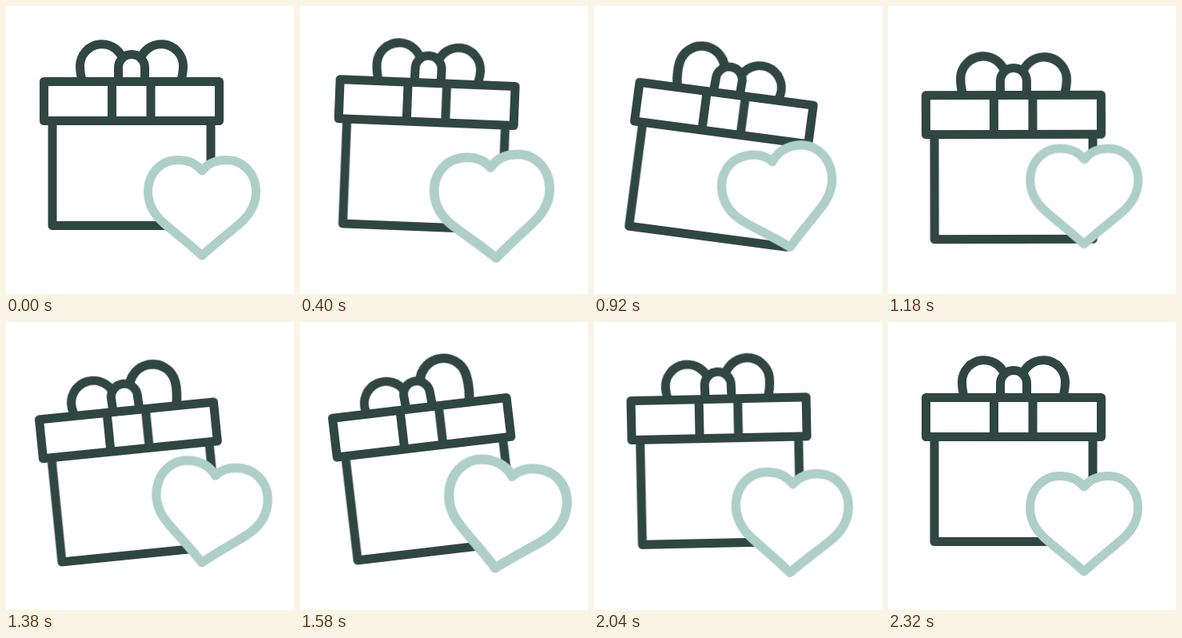
Recreate the animation shown at these times as an HTML page. Size 360 by 360 pixels, loop 2.4 s.

```html
<!DOCTYPE html>
<html lang="en">
<head>
<meta charset="utf-8">
<title>Gift with heart</title>
<style>
  html, body { margin: 0; width: 100%; height: 100%; overflow: hidden; background: #fff; }
  svg { display: block; width: 100vw; height: 100vh; }

  path { fill: none; stroke-width: 11; stroke-linecap: round; stroke-linejoin: round; }
  .solid { fill: #fff; }
  .gift { stroke: #2f4641; --y: 17px; --a: 8.8deg; }
  .heart { stroke: #aecfc7; --y: -14.4px; --a: -13.6deg; }

  .shift, .sway, .pulse, .flop {
    animation: 2400ms cubic-bezier(.333, 0, .667, 1) infinite;
  }
  .shift { animation-name: shift; animation-timing-function: cubic-bezier(.4, 0, .5, 1); }
  .sway { animation-name: sway; }
  .pulse { animation-name: pulse; transform-origin: 245px 249px; }
  .flop { animation-name: flop; transform-origin: 157px 95px; --f: 10deg; --s: 1; --t: 1; }
  .gift .sway { transform-origin: 157px 160px; }
  .heart .sway { transform-origin: 245px 313px; }
  .left { --s: 1.05; }
  .right { --t: 1.07; }
  .knot { --f: 3deg; }

  @keyframes shift {
    0%, 8.333%, 96.667%, 100% { transform: translateY(0); }
    50.833% { transform: translateY(var(--y)); }
  }
  @keyframes sway {
    0%, 8.333%, 96.667%, 100% { transform: rotate(0deg); }
    33.333% { transform: rotate(var(--a)); }
    62.5% {
      transform: rotate(calc(var(--a) * -.79));
      animation-timing-function: cubic-bezier(.333, 0, .5, 1);
    }
  }
  /* the bow trails behind the box, its raised loop swells */
  @keyframes flop {
    0%, 8.333%, 96.667%, 100% { transform: rotate(0deg) scale(1); }
    35.833% { transform: rotate(var(--f)) scale(var(--s)); }
    66.667% { transform: rotate(calc(var(--f) * -1.3)) scale(var(--t)); }
  }
  @keyframes pulse {
    0%, 8.333%, 43.333%, 50%, 96.667%, 100% { transform: scale(1); }
    25.833% { transform: scale(1.15); }
    69.583% { transform: scale(1.11); }
  }
</style>
</head>
<body>
<svg viewBox="0 0 360 360">
  <g class="gift">
    <g class="shift"><g class="sway">
      <path class="flop left" d="M98 103Q92.500 87 92.500 75A27.500 27.500 0 0 1 147 70"/>
      <path class="flop right" d="M216 103Q221.500 87 221.500 75A27.500 27.500 0 0 0 167 70"/>
      <path class="flop knot solid" d="M140.500 100V77a16.500 16.500 0 0 1 33 0V100"/>
      <path class="solid" d="M58 143.500V274.500H256V143.500"/>
      <path class="solid" d="M47.500 94.500H266.500V143.500H47.500Z"/>
      <path d="M132.500 94.500V143.500M181 94.500V143.500"/>
    </g></g>
  </g>
  <g class="heart">
    <g class="shift"><g class="sway">
      <path class="pulse solid" d="M245 206C238 197 227 192.500 215 192.500C193 192.500 177.500 210 177.500 232C177.500 250 187 263 199 273C213 285 230 298 245 312C260 298 277 285 291 273C303 263 312.500 250 312.500 232C312.500 210 297 192.500 275 192.500C263 192.500 252 197 245 206Z"/>
    </g></g>
  </g>
</svg>
</body>
</html>
```
